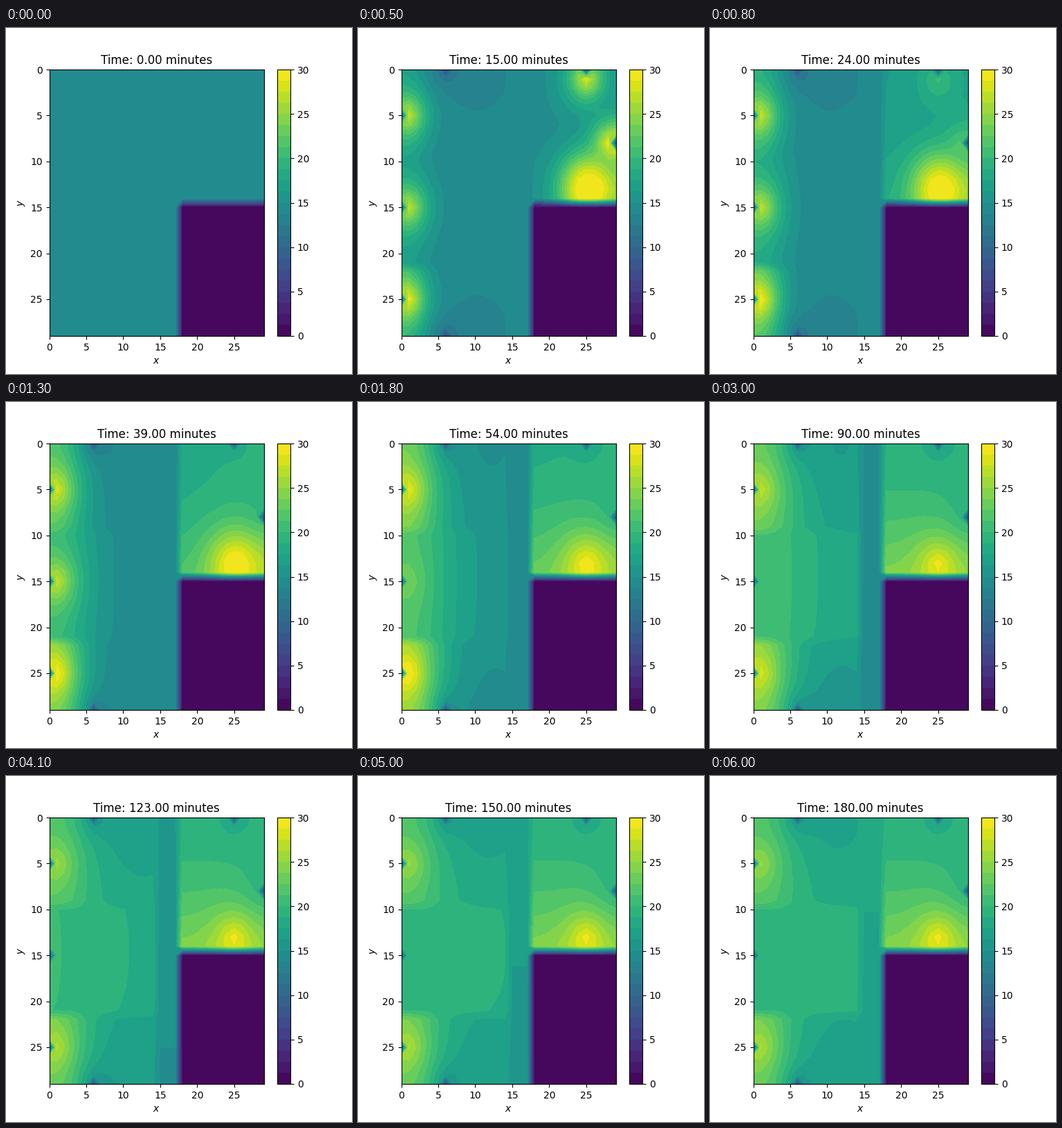
A matplotlib script that plays this animation: 500 px wide and 500 px high, repeating every 6100 ms.

```python
import numpy as np
import matplotlib.pyplot as plt
from matplotlib.animation import FuncAnimation

FRAMES, STEP_MIN = 61, 3.0
START, OUTSIDE = 14.0, 6.0
LEVELS = np.linspace(0, 30, 25)
WINDOWS = [(0, 5), (0, 15), (0, 25), (6, 0), (6, 29), (25, 0), (29, 8)]
X, Y = np.meshgrid(np.arange(30.0), np.arange(30.0))


def approach(t, delay, tau):
    """Exponential rise from 0 to 1 that begins after a delay."""
    return 1 - np.exp(-max(t - delay, 0) / tau)


def spot(x, y, size, power=1.4):
    return np.exp(-(np.hypot(X - x, Y - y) / size) ** power)


def by_east_wall(x, y, size, power=1.4):
    """A spot together with its reflection in the wall at x = 29.5."""
    return spot(x, y, size, power) + spot(59 - x, y, size, power)


def left_room(t, heater_y, climb, wall_end, overshoot, pace, spread,
              max_width, off=None):
    """Warm strip along the west wall plus a heater that calms down."""
    floor = START + climb * approach(t, 36, 45)
    wall = START + (wall_end - START) * (1 - np.exp(-(t / pace) ** 1.5))
    wall += overshoot * np.exp(-((t - 65) / 30) ** 2) * approach(t, 0, 10)
    width = min(np.sqrt(spread * t + 1), max_width)
    peak = (3.8 + 11.5 * np.exp(-t / 33)) * approach(t, 0, 3)
    if off is not None:
        peak *= 1 - approach(t, off, 5)
    strip = max(wall - floor, 0) * np.exp(-(X / width) ** 2)
    return floor + strip + peak * spot(1, heater_y, 2.3)


def left_side(t):
    north = left_room(t, 5, 4.4, 21.8, 2.4, 27, .6, 6.3)
    middle = left_room(t, 15, 4.8, 20, 2.2, 23, .85, 12, off=48)
    south = left_room(t, 25, 3.9, 23, 2.5, 18, .6, 5.6)
    temp = np.where(Y < 10, north, np.where(Y < 22, middle, south))

    # Cold air from the two windows at x = 6
    started = approach(t, 0, 4)
    edge = np.minimum(Y, 29 - Y)
    draught = .45 * started + .8 * approach(t, 45, 20)
    temp -= draught * np.exp(-(X - 9.5) ** 2 / 50 - edge ** 2 / 38)
    temp -= 3.5 * started * (spot(6, 0, 1.6) + spot(6, 29, 1.6))

    fall = .045 * approach(t, 60, 20)
    corridor = START + .033 * max(t - 60, 0) - fall * Y
    return np.where(X >= 15, corridor, temp)


def right_side(t):
    started = approach(t, 0, 4)
    mixed = approach(t, 13, 20)
    temp = START + 5.1 * mixed * (1 + (Y / 14) ** 1.6)
    temp += .15 * (X - 18) * np.exp(-((t - 39) / 15) ** 2)
    temp += 5.8 * mixed * spot(25, 13, 2.5)

    # Full power at first; two of the heaters soon switch off
    short = 12 * started * (1 - approach(t, 18, 5))
    wide = 18 * started * (1 - mixed)
    temp += np.sqrt((wide * by_east_wall(25.3, 13, 4, 2.2)) ** 2
                    + (short * by_east_wall(28, 8, 2.3)) ** 2
                    + (short * 1.2 * spot(25, 1, 2.3)) ** 2)
    return temp - mixed * (3 * spot(25, 0, 1.2) + 2.1 * spot(29, 8, 2.6))


def field(t):
    temp = np.where(X >= 18, right_side(t), left_side(t))
    if t > 0:
        for x, y in WINDOWS:
            temp[y, x] = OUTSIDE
    temp[15:, 18:] = 0
    return np.clip(temp, 0, 29.99)


def fill(t):
    return ax.contourf(X, Y, field(t), levels=LEVELS, cmap="viridis")


fig, ax = plt.subplots(figsize=(5, 5), dpi=100)
plot = fill(0)
fig.colorbar(plot, ax=ax, ticks=range(0, 31, 5))
ax.invert_yaxis()
ax.set_xlabel("$x$")
ax.set_ylabel("$y$")
title = ax.set_title("Time: 0.00 minutes")


def draw(frame):
    global plot
    t = frame * STEP_MIN
    plot.remove()
    plot = fill(t)
    title.set_text(f"Time: {t:.2f} minutes")
    return plot, title


anim = FuncAnimation(fig, draw, frames=FRAMES, interval=100, repeat=True)
plt.show()
```
